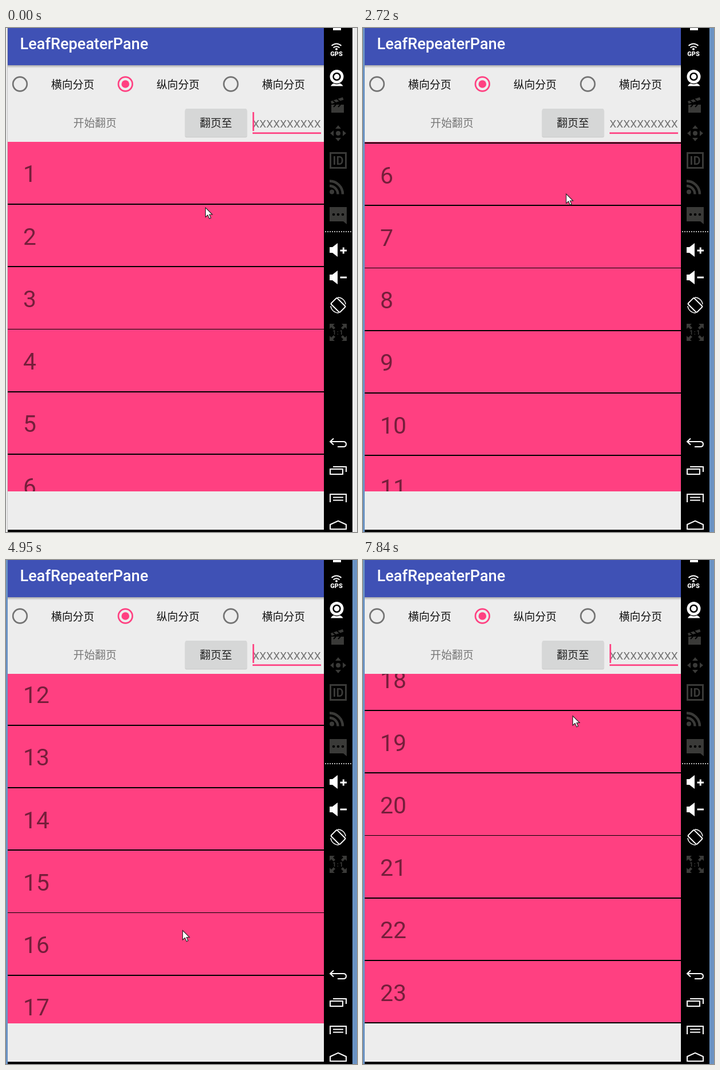
An HTML page that plays this animation: 615 px wide and 881 px high, repeating every 8 s.

```html
<!DOCTYPE html>
<html lang="zh-CN">
<head>
<meta charset="utf-8">
<title>Paged list</title>
<style>
html, body { margin: 0; height: 100%; overflow: hidden; }
svg { display: block; width: 615px; height: 881px; }
text { font-family: Roboto, "Noto Sans CJK SC", "Noto Sans CJK", sans-serif; font-size: 18.9px; }
#rows text { font-size: 41px; fill: #761e3b; }
#rows rect { shape-rendering: crispEdges; }
.line { fill: none; stroke: #fff; stroke-width: 2; }
.dim { fill: #3a3a38; }
.dimline { fill: none; stroke: #3a3a38; }
</style>
</head>
<body>
<svg viewBox="0 0 615 881">
  <defs>
    <clipPath id="listClip"><rect x="3" y="199" width="554" height="611"/></clipPath>
    <linearGradient id="shade" x2="0" y2="1">
      <stop stop-opacity=".28"/><stop offset="1" stop-opacity="0"/>
    </linearGradient>
  </defs>

  <rect id="desk" width="615" height="881"/>
  <path id="edge" d="M2.5 0V877" stroke="#c4c4c4"/>
  <rect x="3" width="554" height="877" fill="#ededed"/>
  <path d="M3 877H557V0H607V881H3Z"/>

  <!-- app bar -->
  <rect x="3" width="554" height="65" fill="#3f51b5"/>
  <rect x="3" y="65" width="554" height="5" fill="url(#shade)"/>
  <text x="24.5" y="37" fill="#fff" style="font-size:27.2px;font-weight:500">LeafRepeaterPane</text>

  <!-- controls -->
  <g id="radios"></g>
  <text x="118" y="173" fill="#777">开始翻页</text>
  <rect x="313.5" y="142.5" width="109" height="49" rx="3" opacity=".13"/>
  <rect x="314" y="141" width="108" height="49" rx="2.5" fill="#d6d7d7"/>
  <text x="339.5" y="173" fill="#222">翻页至</text>
  <text x="432" y="173.5" fill="#757575" style="font-size:19.1px">XXXXXXXXXX</text>
  <rect x="432" y="182.4" width="120" height="2.7" fill="#ff4081"/>
  <rect id="caret" x="432" y="147" width="2.7" height="33" fill="#ff4081"/>

  <!-- list -->
  <g clip-path="url(#listClip)">
    <rect x="3" y="199" width="554" height="611" fill="#ff4081"/>
    <g id="rows"></g>
    <circle id="glow" cx="312" r="1150" fill="#3f51b5"/>
  </g>

  <!-- emulator toolbar -->
  <g fill="#fff">
    <rect x="573" width="14" height="4"/>
    <path class="line" d="M570.5 31q8.5-7 17 0M573.5 34.5q5.5-4.5 11 0"/>
    <circle cx="579" cy="37" r="2"/>
    <text x="579" y="48.5" text-anchor="middle" style="font-size:11px;font-weight:900">GPS</text>
    <circle cx="579.5" cy="85" r="12"/>
    <circle cx="579.5" cy="85" r="6" fill="none" stroke="#000" stroke-width="2.5"/>
    <path d="M569 101.500q2-4 5-4.500 5.500 2.500 11 0 3.500.5 5.500 4.500Z"/>
  </g>
  <g class="dim">
    <path d="M570 134h22v14h-22ZM569 128l21-7 1.500 4.500-21 7Z"/>
    <path d="M573 127l5 4M580 124l5 4M574 138l4-4M582 138l4-4" stroke="#000" stroke-width="2"/>
    <circle cx="582" cy="184" r="4"/>
    <path id="arrow" d="M577 176l5-6 5 6Z"/>
    <use href="#arrow" transform="rotate(90 582 184)"/>
    <use href="#arrow" transform="rotate(180 582 184)"/>
    <use href="#arrow" transform="rotate(270 582 184)"/>
    <rect class="dimline" x="568.5" y="218.5" width="27" height="26" stroke-width="3"/>
    <text x="582" y="239" text-anchor="middle" style="font-size:20px;font-weight:700">ID</text>
    <circle cx="571" cy="286.5" r="4"/>
    <path class="dimline" d="M567 276a14.5 14.5 0 0 1 14.5 14.5M567 267.5a23 23 0 0 1 23 23" stroke-width="4.5"/>
    <path d="M567 313h30v30l-6-5h-24Z"/>
    <path d="M574 326h.01m8 0h.01m8 0h.01" stroke="#000" stroke-width="4.600" stroke-linecap="round"/>
    <path id="corner" d="M567 517h9l-3 3 4 4-3 3-4-4-3 3Z"/>
    <use href="#corner" transform="matrix(-1 0 0 1 1164 0)"/>
    <use href="#corner" transform="matrix(1 0 0 -1 0 1064)"/>
    <use href="#corner" transform="rotate(180 582 532)"/>
    <text x="582" y="536" text-anchor="middle" style="font-size:11px;font-weight:700;letter-spacing:1.5px">1:1</text>
  </g>
  <path d="M559 356H606" stroke="#bbb" stroke-width="2" stroke-dasharray="2 2"/>
  <g fill="#fff">
    <path id="speaker" d="M567 383h5l9-7v24l-9-7h-5Z"/>
    <use href="#speaker" y="48"/>
    <path d="M585.5 389h11.5M591.25 383.5v11M585.5 436h11.5" stroke="#fff" stroke-width="3"/>
  </g>
  <g class="line">
    <rect x="574.5" y="473.5" width="15" height="22" rx="2" transform="rotate(-45 582 484.5)"/>
    <path d="M581 471a13.5 13.5 0 0 1 14 12M583 498a13.5 13.5 0 0 1-14-12" stroke-width="1.5"/>
    <path d="M574 717.5l-6 5.500 6 5.500M568 723h23q5 0 5 4.500t-5 4.500h-10"/>
    <path d="M568 771h22v9h-22ZM573 767h23v9"/>
    <path d="M568 829v-14h28v14M573 820.500h18M573 825.500h18"/>
    <path d="M568 876v-8l14-6.500 14 6.500v8Z"/>
  </g>

  <path id="cursor" d="M0 0V16.500L4 13l2.800 6.200 2.700-1.200L6.800 12H12Z" fill="#fff" stroke="#222" stroke-width="1.1"/>
</svg>
<script>
const LOOP = 8000, TOP = 199, ROW = 109.25, ROWS = 23, PAGE = 610.5, END = 1902.25;
const DRAG = 430, REST = 150, SNAP = 555, LAG = 50;

// Each swipe drags from one point to another and turns one page.
const swipes = [
  { start: 2230, from: [354.5, 654], to: [356, 290] },
  { start: 3640, from: [343.5, 708.5], to: [350, 310] },
  { start: 4950, from: [309.5, 647.5], to: [333.5, 279.5] },
  { start: 5950, from: [386, 640], to: [367.5, 272.5] }
];
const el = id => document.getElementById(id);
const set = (id, name, value) => el(id).setAttribute(name, value);
const clamp = u => Math.min(1, Math.max(0, u));
const ease = u => (u = clamp(u), u * u * (3 - 2 * u));
const mix = (a, b, s) => a.map((v, i) => v + (b[i] - v) * s);

el("radios").innerHTML = ["横向分页", "纵向分页", "横向分页"].map((label, i) => {
  const x = 24.5 + i * 184.7, on = i === 1, color = on ? "#ff4081" : "#737373";
  return `<circle cx="${x}" cy="98" r="12.3" fill="none" stroke="${color}" stroke-width="2.7"/>
    ${on ? `<circle cx="${x}" cy="98" r="6.8" fill="${color}"/>` : ""}
    <text x="${x + 54.5}" y="105.5" fill="#111">${label}</text>`;
}).join("");

el("rows").innerHTML = Array.from({ length: ROWS }, (_, i) => {
  const y = TOP + i * ROW;
  return `<text x="30" y="${y + 70.3}">${i + 1}</text>
    <rect x="3" y="${y + ROW - 1.2}" width="554" height="1.7"/>`;
}).join("");

// Between swipes the pointer travels back to the next starting point.
function pointer(t) {
  let point = [349.5, 314], free = 620;
  for (const { start, from, to } of swipes) {
    const travel = Math.min(1280, start - 100 - free);
    point = mix(point, from, ease((t - free) / travel));
    point = mix(point, to, ease((t - start) / DRAG));
    free = start + DRAG + REST;
  }
  return point;
}

function scrollAt(t) {
  const pages = swipes.reduce((sum, s) => sum + ease((t - s.start - LAG) / SNAP), 0);
  return Math.min(END, pages * PAGE);
}

function draw(t) {
  const hitEnd = swipes[swipes.length - 1].start + 160;
  const glow = Math.min(1, 1.3 * Math.sin(Math.PI * clamp((t - hitEnd) / 500)));
  set("desk", "fill", t < 250 ? "#ececec" : "#6a93c4");
  set("edge", "opacity", t < 250 ? 1 : 0);
  set("cursor", "transform", `translate(${pointer(t)})`);
  set("rows", "transform", `translate(0 ${-scrollAt(t)})`);
  set("caret", "opacity", (t + 170) % 1000 < 500 ? 1 : 0);
  set("glow", "cy", 810 - 79 * glow + 1150);
  set("glow", "opacity", 0.08 * glow);
}

function tick() {
  draw(performance.now() % LOOP);
  requestAnimationFrame(tick);
}
tick();
</script>
</body>
</html>
```
